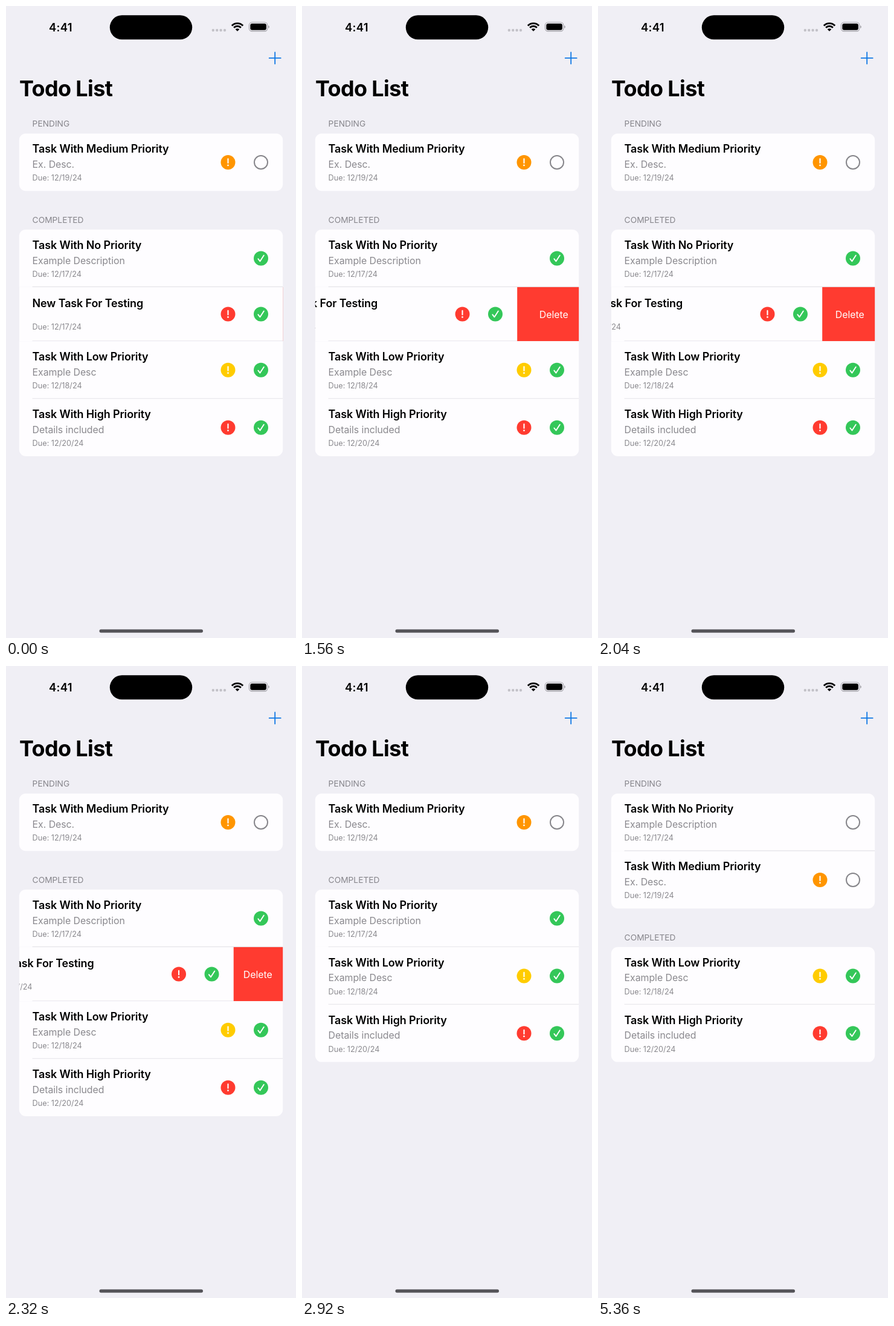
Write an HTML page that moves like this. It is 480x1043 px and loops after 5.56 s.

```html
<!DOCTYPE html>
<html lang="en">
<head>
<meta charset="utf-8">
<title>Todo List</title>
<style>
  html, body { margin: 0; width: 100%; height: 100%; overflow: hidden; background: #f0eff5; }
  svg { display: block; width: 100vw; height: 100vh; font-family: Inter, sans-serif; }
  .large { font-size: 36px; font-weight: 700; letter-spacing: -0.65px; }
  .clock { font-size: 18.5px; font-weight: 600; letter-spacing: 0.3px; }
  .head { font-size: 13.75px; fill: #86858b; }
  .name { font-size: 18px; font-weight: 600; letter-spacing: -0.14px; }
  .desc { font-size: 15.9px; letter-spacing: -0.06px; fill: #8a898e; }
  .due { font-size: 12.7px; fill: #8a898e; }
  .delete { font-size: 15.9px; letter-spacing: -0.06px; fill: #fff; }
</style>
</head>
<body>
<svg id="stage" viewBox="0 0 480 1043"></svg>
<script>
const LOOP = 5560, STEP = 40;
const LEFT = 21.8, RIGHT = 458.2, INDENT = 43.6, RADIUS = 11;
const WIDTH = RIGHT - LEFT, ROW = 94.9, SHORT_ROW = 89.4;
const PENDING = 210.4, DONE = 368.9, SECOND = DONE + ROW;
const RED = '#ff3b30', ORANGE = '#ff9500', YELLOW = '#ffcc00', GREEN = '#34c759', GREY = '#86858a';

const text = (cls, x, y, s) => `<text class="${cls}" x="${x}" y="${y}">${s}</text>`;
const line = y => `<path d="M${INDENT} ${y - 0.4}H${RIGHT}" stroke="#e4e3e8" stroke-width="1.1"/>`;

// Card outline from y, with separate top (a) and bottom (b) corner radii
function cardPath(y, h, a, b) {
  return `M${LEFT} ${y + a}a${a} ${a} 0 0 1 ${a} ${-a}h${WIDTH - 2 * a}a${a} ${a} 0 0 1 ${a} ${a}` +
    `v${h - a - b}a${b} ${b} 0 0 1 ${-b} ${b}h${2 * b - WIDTH}a${b} ${b} 0 0 1 ${-b} ${-b}z`;
}
const card = (y, h, top, bottom, id = '') =>
  `<path id="${id}" fill="#fefdff" d="${cardPath(y, h, top, bottom)}"/>`;

const alertIcon = (y, color) => `<g transform="translate(367.5 ${y})">
  <circle r="12" fill="${color}"/>
  <path d="M0 -5.6V1" stroke="#fff" stroke-width="2.1" stroke-linecap="round"/>
  <circle cy="4.9" r="1.35" fill="#fff"/></g>`;
const ring = (y, color, id = '') =>
  `<circle id="${id}" cx="422" cy="${y}" r="11" fill="none" stroke="${color}" stroke-width="2"/>`;
const check = (y, id = '') => `<g id="${id}" transform="translate(422 ${y})">
  <circle r="12" fill="${GREEN}"/>
  <path d="M-4.6 0.8L-1.5 4.8L4.8 -5" fill="none" stroke="#fff" stroke-width="1.9"
    stroke-linecap="round" stroke-linejoin="round"/></g>`;

function row(y, name, desc, due, color, mark) {
  const mid = y + 47.6;
  return text('name', INDENT, y + 32, name) + text('desc', INDENT, y + 56.6, desc) +
    text('due', INDENT, y + 77.8, 'Due: ' + due) +
    (color ? alertIcon(mid, color) : '') + mark(mid);
}

// Quarter-circle band of the wireless sign
function band(r) {
  const d = r * Math.SQRT1_2;
  return `<path d="M${383 - d} ${41.6 - d}a${r} ${r} 0 0 1 ${2 * d} 0"/>`;
}

const statusBar = `
  ${text('clock', 71, 41.6, '4:41')}
  <rect x="171.8" y="15.3" width="136.4" height="40" rx="20"/>
  <g fill="#c3c2c8">${[0, 1, 2, 3].map(i =>
    `<circle cx="${342.8 + i * 6.4}" cy="40" r="2.2"/>`).join('')}</g>
  <g fill="none" stroke="#000" stroke-width="2.9">${band(13)}${band(8.3)}</g>
  <path d="M383 41.8L379.7 38.5a4.7 4.7 0 0 1 6.6 0z"/>
  <rect x="402.4" y="27" width="30.4" height="14.6" rx="4.6" fill="none" stroke="#a09fa5" stroke-width="1.1"/>
  <rect x="404.3" y="28.9" width="26.6" height="10.8" rx="3"/>
  <path d="M434.2 32a2.6 2.6 0 0 1 0 4.8z" fill="#a09fa5"/>`;

const stage = document.getElementById('stage');
stage.innerHTML = `
  <clipPath id="rowClip"><rect x="${LEFT}" y="${SECOND}" width="${WIDTH}" height="${SHORT_ROW}"/></clipPath>
  <rect width="480" height="1043" fill="#f0eff5"/>
  ${statusBar}
  <path d="M445.2 76.4V95.4M435.7 85.9H454.7" stroke="#0f78e4" stroke-width="1.8" stroke-linecap="round"/>
  ${text('large', 22, 149, 'Todo List')}
  <g id="oldRow">
    ${card(DONE, ROW, RADIUS, 0)}
    ${row(DONE, 'Task With No Priority', 'Example Description', '12/17/24', null,
      y => check(y, 'oldCheck') + ring(y, GREEN, 'oldRing'))}
    ${line(SECOND)}
  </g>
  <g id="swipeRow" clip-path="url(#rowClip)">
    <rect x="${LEFT}" y="${SECOND}" width="${WIDTH}" height="${SHORT_ROW}" fill="#fefdff"/>
    <g id="content">
      ${text('name', INDENT, 497.4, 'New Task For Testing')}
      ${text('due', INDENT, 534.4, 'Due: 12/17/24')}
      ${alertIcon(508.5, RED)}${check(508.5)}
    </g>
    <g id="rowLine">${line(SECOND)}</g>
    <rect id="action" y="${SECOND}" width="${WIDTH}" height="${SHORT_ROW}" fill="${RED}"/>
    <text id="label" class="delete" y="514.6">Delete</text>
  </g>
  <g id="lower">
    ${card(SECOND, 2 * ROW, 0, RADIUS, 'lowerCard')}
    ${row(SECOND, 'Task With Low Priority', 'Example Desc', '12/18/24', YELLOW, check)}
    ${line(SECOND + ROW)}
    ${row(SECOND + ROW, 'Task With High Priority', 'Details included', '12/20/24', RED, check)}
  </g>
  <g id="newRow">
    ${card(PENDING, ROW, RADIUS, 0)}
    ${row(PENDING, 'Task With No Priority', 'Example Description', '12/17/24', null, y => ring(y, GREY))}
  </g>
  <g id="medium">
    ${card(PENDING, ROW, RADIUS, RADIUS, 'mediumCard')}
    <g id="mediumLine">${line(PENDING)}</g>
    ${row(PENDING, 'Task With Medium Priority', 'Ex. Desc.', '12/19/24', ORANGE, y => ring(y, GREY))}
  </g>
  ${text('head', INDENT, 199.4, 'PENDING')}
  <g id="doneHead">${text('head', INDENT, 358, 'COMPLETED')}</g>
  <rect x="154.5" y="1028.8" width="171.5" height="5.4" rx="2.7" fill="#56555a"/>`;

const el = id => document.getElementById(id);
const set = (id, attrs) => {
  for (const k in attrs) el(id).setAttribute(k, attrs[k]);
};
const show = (id, on) => set(id, { display: on ? 'inline' : 'none' });
const move = (id, x, y) => set(id, { transform: `translate(${x} ${y})` });
const mix = (a, b, p) => a + (b - a) * p;
const clamp = p => Math.min(1, Math.max(0, p));

// Critically damped spring, ms since start
function spring(ms, speed) {
  const x = Math.max(0, ms) / 1000 * speed;
  return 1 - (1 + x) * Math.exp(-x);
}

// Ease in and out along cubic-bezier(.42, 0, .58, 1)
function ease(p) {
  let lo = 0, hi = 1;
  for (let i = 0; i < 20; i++) {
    const s = (lo + hi) / 2, r = 1 - s;
    if (3 * r * r * s * 0.42 + 3 * r * s * s * 0.58 + s * s * s < p) lo = s;
    else hi = s;
  }
  return lo * lo * (3 - 2 * lo);
}

function swipe(t) {
  if (t < 1320) return 0;
  if (t < 1840) return mix(46, 110, 1 - (1 - clamp((t - 1320) / 480)) ** 3);
  return mix(110, 81.3, spring(t - 1840, 15));
}

function draw(t) {
  const gone = t >= 2920 ? 1 : spring(t - 2400, 17);
  const offset = mix(swipe(t), WIDTH, gone);
  const edge = RIGHT - offset;
  const shift = SHORT_ROW * (1 - gone);
  show('swipeRow', gone < 1);
  move('content', -offset, 0);
  set('action', { x: edge });
  set('label', { x: Math.max(edge + 16, 392.8) });
  move('rowLine', 0, shift);
  move('lower', 0, shift);

  const toggled = t >= 5080;
  const p = ease(clamp((t - 5040) / 300));
  show('oldCheck', !toggled);
  show('oldRing', toggled);
  set('oldRow', { opacity: 1 - p });
  set('newRow', { opacity: p });
  set('lowerCard', { d: cardPath(SECOND, 2 * ROW, toggled ? RADIUS : 0, RADIUS) });
  set('mediumCard', { d: cardPath(PENDING, ROW, toggled ? 0 : RADIUS, RADIUS) });
  set('mediumLine', { opacity: p });
  move('medium', 0, ROW * p);
  move('doneHead', 0, ROW * p);
}

const start = performance.now();
function tick() {
  const t = (performance.now() - start) % LOOP;
  draw(Math.floor(t / STEP) * STEP);
  requestAnimationFrame(tick);
}
draw(0);
requestAnimationFrame(tick);
</script>
</body>
</html>
```
